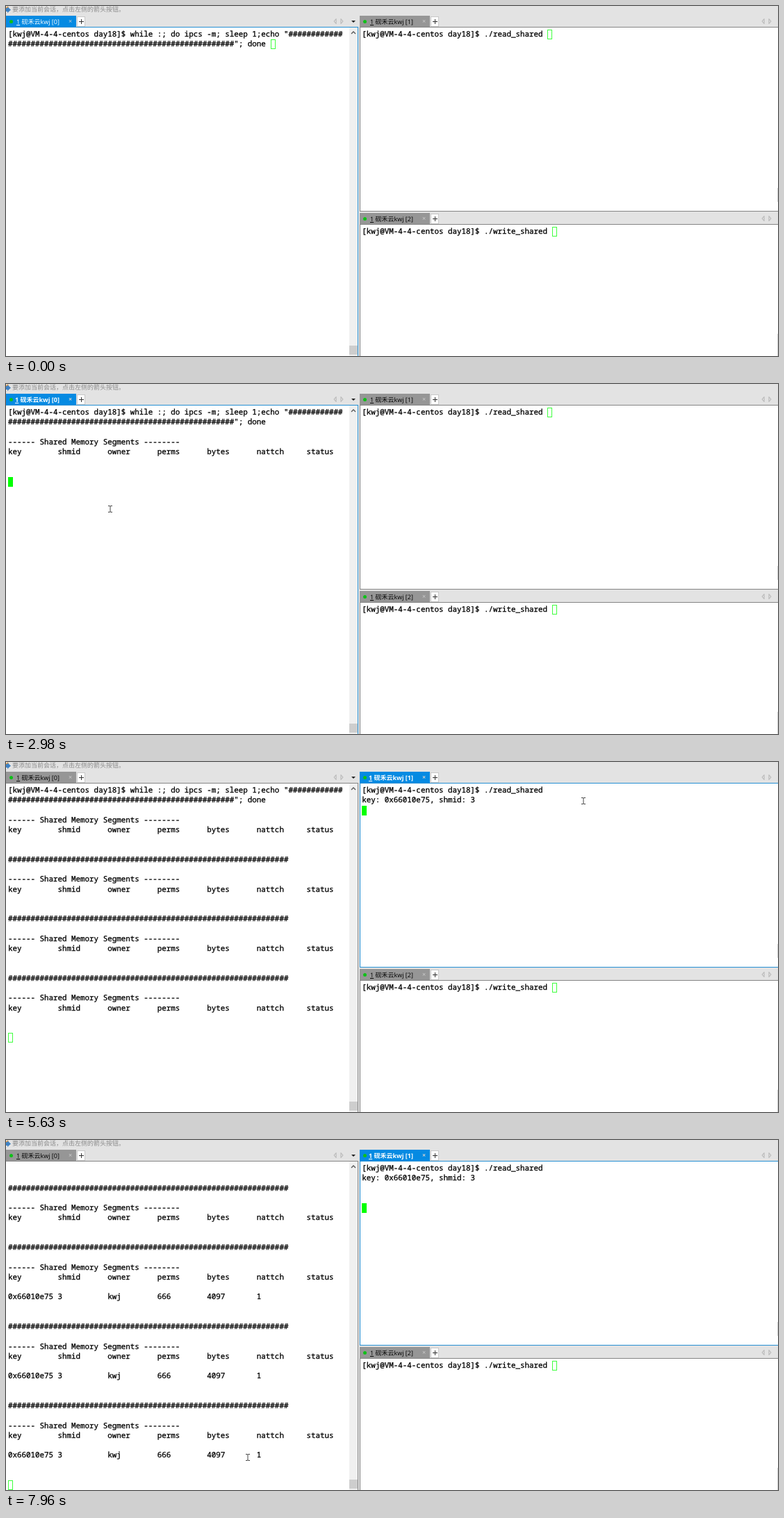
An HTML page for the animation above (8000 ms loop, 1111x504 px).

```html
<!DOCTYPE html>
<html lang="zh">
<meta charset="utf-8">
<title>Shared memory terminals</title>
<style>
  html, body { margin: 0; width: 100%; height: 100%; overflow: hidden; background: #e3e3e3; }
  body { font: 9px/16px "Open Sans", "Noto Sans CJK SC", "Noto Sans CJK", sans-serif; text-rendering: geometricPrecision; }
  div, pre, svg, span { position: absolute; box-sizing: border-box; margin: 0; white-space: pre; }
  #hint { left: 9px; top: -3px; color: #8a8a8a; }
  .bar { height: 17px; }
  .tab { left: 0; top: 0; width: 101px; height: 16px; background: #969696; color: #000; }
  .tab.on { background: #058ae2; color: #fff; }
  .tab.focus { font-weight: bold; }
  .tab i { position: absolute; left: 5px; top: 6px; width: 5px; height: 5px; border-radius: 50%; background: #0fc018; }
  .title { left: 15px; top: 1px; }
  .focus .title { left: 13px; }
  .close { left: 90px; top: 0; color: #d0d0d0; }
  .plus { left: 102px; top: 1px; width: 12px; height: 15px; background: #fff; border: 1px solid #c8c8c8; }
  .plus::before, .plus::after { content: ""; position: absolute; left: 2px; top: 6px; width: 7px; height: 1px; background: #333; }
  .plus::after { transform: rotate(90deg); }
  .pane { background: #fff; overflow: hidden; border: 0 solid #858585; }
  .pane.on { border-color: #248fd3; }
  pre { font: 10.85px/14.25px "Noto Sans Mono", monospace; color: #000; -webkit-text-stroke: .3px #000; }
  .caret { width: 7px; height: 14px; border: 1px solid #40ff40; }
  .caret.full { background: #0f0; border-color: #0f0; }
  .tick { left: 1110px; width: 1px; background: #d4d4d4; }
</style>
<body>
<svg width="8" height="12" style="left:0;top:0"><path d="M0 2L3 0L4 3L0 5Z" fill="#e9a04a"/><path d="M0 3H2V1L7 5.5L2 10V8H0Z" fill="#3f82c4"/></svg>
<div id="hint">要添加当前会话，点击左侧的箭头按钮。</div>
<script>
const LOOP = 8000, CELL = 6.51, LINE = 14.25, LAST_ROW = 32;
const USER = "kwj", HOST = "砚禾云";
const PROMPT = `[${USER}@VM-4-4-centos day18]$ `;
const HASH = "#".repeat(62);
const row = cells => cells.map(c => c.padEnd(11)).join("").trimEnd();
const HEAD = row(["key", "shmid", "owner", "perms", "bytes", "nattch", "status"]);
const DATA = row(["0x66010e75", "3", USER, "666", "4097", "1"]);

// Event times in ms
const FOCUS_LEFT = 800, FOCUS_RIGHT = 4600, RUN_READ = 5600;
const FIRST_LIST = 1992, LIST_EVERY = 993, READ_EVERY = 1000;

function add(parent, cls, style = "", html = "") {
  const el = document.createElement("div");
  el.className = cls;
  el.style.cssText = style;
  el.innerHTML = html;
  return parent.appendChild(el);
}

const arrows = x => `<svg width="16" height="10" style="left:${x}px;top:3px" fill="none" stroke="#b0b0b0"><path d="M4 1.5L1 5L4 8.5ZM11 1.5L14 5L11 8.5Z"/></svg>`;

// A tab bar with a terminal below it; (x, y) is the bar's corner
function terminal(index, x, y, width, height, borders, textX, textY, arrowX) {
  const bar = add(document.body, "bar", `left:${x}px;top:${y}px;width:${width}px`,
    `<div class="tab"><i></i><span class="title"><u>1</u> ${HOST}${USER} [${index}]</span><span class="close">×</span></div>
     <div class="plus"></div>${arrows(arrowX)}`);
  const pane = add(document.body, "pane",
    `left:${x}px;top:${y + 16}px;width:${width}px;height:${height}px;border-width:${borders}`);
  const text = document.body.appendChild(document.createElement("pre"));
  text.style.cssText = `left:${textX}px;top:${textY}px`;
  const caret = add(document.body, "caret");
  const tab = bar.firstChild;
  return (lines, active, focused) => {
    const shown = lines.slice(Math.max(0, lines.length - 1 - LAST_ROW));
    const content = shown.join("\n");
    if (text.textContent !== content) text.textContent = content;
    tab.classList.toggle("on", active);
    tab.classList.toggle("focus", focused);
    pane.classList.toggle("on", active);
    caret.classList.toggle("full", focused);
    caret.style.left = Math.round(textX + shown.at(-1).length * CELL) + "px";
    caret.style.top = Math.round(textY + (shown.length - 1) * LINE) + "px";
  };
}

const left = terminal(0, 0, 14, 507, 474, "1px 1px 0 0", 3, 34, 471);
const reader = terminal(1, 509, 14, 602, 266, "1px 0 1px 1px", 512.3, 34, 578);
const writer = terminal(2, 509, 298, 602, 190, "1px 0 0 1px", 512.3, 317.5, 578);

add(document.body, "", "left:494px;top:31px;width:12px;height:473px;background:#f0f0f0",
  `<svg width="12" height="14"><path d="M3 9L6 6L9 9" fill="none" stroke="#555" stroke-width="1.3"/></svg>
   <div style="top:458px;width:12px;height:13px;background:#cdcdcd"></div>`);
add(document.body, "", "left:497px;top:21px;border:3px solid transparent;border-top-color:#222");
add(document.body, "tick", "top:262px;height:20px");
add(document.body, "tick", "top:472px;height:32px");
const pointer = add(document.body, "", "left:-4px;top:-6px",
  `<svg width="8" height="12" fill="none" stroke="#444"><path d="M1 1.5H3.2L4 2.2L4.8 1.5H7M4 2V10M1 10.5H3.2L4 9.8L4.8 10.5H7"/></svg>`);

// Pointer stops: time, x, y
const PATH = [
  [190, 900, 440], [500, 590, 310], [800, 270, 236], [930, 250, 232], [1360, 250, 232],
  [2060, 75, 90], [2170, 75, 90], [2300, 207, 69], [2500, 390, 60], [2700, 300, 250],
  [2920, 150, 180], [3290, 150, 180], [3600, 300, 130], [3910, 427, 96], [4040, 440, 90],
  [4100, 440, 90], [4550, 800, 62], [4730, 832, 55], [4900, 832, 55], [5020, 831, 56],
  [5650, 831, 56], [6020, 678, 62], [6080, 678, 62], [6860, 358, 411], [6990, 336, 443],
  [7300, 342, 476], [7710, 348, 456], [7960, 348, 457], [LOOP, 348, 457]
];

function movePointer(t) {
  const i = PATH.findIndex(stop => stop[0] > t);
  pointer.style.visibility = i > 0 ? "visible" : "hidden";
  if (i < 1) return;
  const [t0, x0, y0] = PATH[i - 1], [t1, x1, y1] = PATH[i];
  const k = (t - t0) / (t1 - t0);
  pointer.style.transform = `translate(${Math.round(x0 + (x1 - x0) * k)}px,${Math.round(y0 + (y1 - y0) * k)}px)`;
}

const ticks = (t, start, every) => t < start ? 0 : 1 + Math.floor((t - start) / every);

function listing(t) {
  const lines = [PROMPT + 'while :; do ipcs -m; sleep 1;echo "' + HASH.slice(0, 12), HASH.slice(12) + '"; done '];
  const count = ticks(t, FIRST_LIST, LIST_EVERY);
  for (let i = 0; i < count; i++) {
    if (i) lines.push(HASH);
    lines.push("", "------ Shared Memory Segments --------", HEAD, "");
    if (FIRST_LIST + i * LIST_EVERY > RUN_READ) lines.push(DATA, "");
    lines.push("");
  }
  if (count) lines.push("");
  return lines;
}

function reading(t) {
  const lines = [PROMPT + "./read_shared "];
  const count = ticks(t, RUN_READ, READ_EVERY);
  if (count) lines.push("key: 0x66010e75, shmid: 3", ...Array(count).fill(""));
  return lines;
}

function draw(now) {
  const t = now % LOOP, right = t >= FOCUS_RIGHT;
  left(listing(t), !right, !right && t >= FOCUS_LEFT);
  reader(reading(t), right, right);
  writer([PROMPT + "./write_shared "], false, false);
  movePointer(t);
  requestAnimationFrame(() => draw(performance.now()));
}
draw(performance.now());
</script>
</body>
</html>
```
